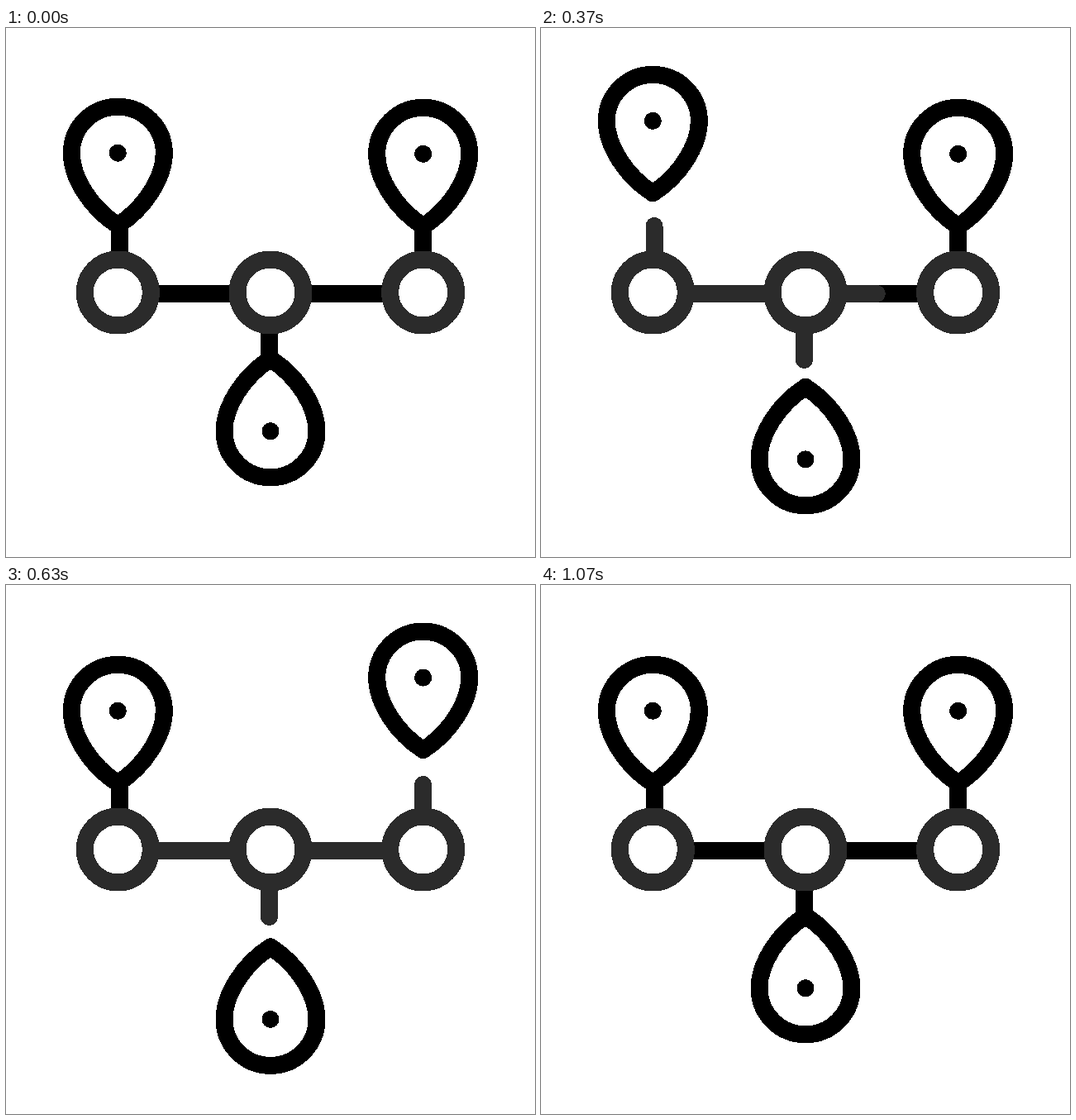
These frames come from a looping animation (640x640 px, 1.67 s). An HTML page:

```html
<!DOCTYPE html>
<html lang="en">
<head>
<meta charset="utf-8">
<title>Pins on a line</title>
<style>
  html, body { margin: 0; width: 100%; height: 100%; overflow: hidden; background: #fff; }
  svg { display: block; width: 100%; height: 100%; shape-rendering: crispEdges; }
  .line { fill: none; stroke: #000; stroke-width: 21; stroke-linecap: round; }
  .fill { stroke: #2b2b2b; }
  .ring { fill: #fff; stroke: #2b2b2b; stroke-width: 21; }
  .drop { fill: #fff; stroke: #000; stroke-width: 21; stroke-linejoin: round; }
</style>
</head>
<body>
<svg viewBox="0 0 640 640">
  <g id="lines"></g>
  <g id="rings"></g>
  <g id="pins"></g>
</svg>
<script>
const LOOP = 1670, FPS = 30, LAST = 32;
const LEFT = 135.3, MIDDLE = 320, RIGHT = 504.7;

// Times are in steps of 1/30 s: [start, duration] out, then [start, duration] back.
const pins = [
  { x: LEFT, y: 152.3, lift: -66, out: [-0.5, 6.7], back: [7.67, 7.75] },
  { x: MIDDLE, y: 487.8, lift: 63.2, flip: true, out: [6.9, 7.8], back: [15.2, 8.7] },
  { x: RIGHT, y: 152.3, lift: -66, out: [14.7, 7.5], back: [23.2, 8] }
];

const lines = [
  { from: [137, 280], to: [137, 239.5], out: [0, 3.5], back: [14, 2.8] },
  { from: [175, 321.5], to: [280, 321.5], out: [3.2, 5], back: [19, 3.7] },
  { from: [318.5, 360], to: [318.5, 401.5], out: [7, 3.5], back: [21.5, 3] },
  { from: [360, 321.5], to: [465, 321.5], out: [8.7, 5], back: [25.5, 4] },
  { from: [504.5, 280], to: [504.5, 241.5], out: [15, 3.5], back: [29, 2.8] }
];

function add(parent, tag, attrs) {
  const node = document.createElementNS("http://www.w3.org/2000/svg", tag);
  for (const name in attrs) node.setAttribute(name, attrs[name]);
  return parent.appendChild(node);
}

function ease(step, [start, duration]) {
  const u = Math.min(1, Math.max(0, (step - start) / duration));
  return u * u * (3 - 2 * u);
}

const amount = (step, part) => ease(step, part.out) - ease(step, part.back);

const byId = id => document.getElementById(id);

for (const line of lines) {
  const d = `M${line.from}L${line.to}`;
  add(byId("lines"), "path", { class: "line", d });
  line.node = add(byId("lines"), "path", { class: "line fill", d });
}

for (const cx of [LEFT, MIDDLE, RIGHT]) {
  add(byId("rings"), "circle", { class: "ring", cx, cy: 320, r: 40 });
}

for (const pin of pins) {
  pin.node = add(byId("pins"), "g", {});
  add(pin.node, "path", {
    class: "drop",
    d: "M0 87.5C-33 66.5-56 29.5-56 0A56 56 0 0 1 56 0C56 29.5 33 66.5 0 87.5Z"
  });
  add(pin.node, "circle", { r: 10.5 });
}

function draw(step) {
  for (const pin of pins) {
    const y = pin.y + pin.lift * amount(step, pin);
    pin.node.setAttribute("transform", `translate(${pin.x} ${y}) scale(1 ${pin.flip ? -1 : 1})`);
  }
  for (const { node, from, to, ...part } of lines) {
    const k = amount(step, part);
    const end = from.map((v, i) => v + (to[i] - v) * k);
    node.setAttribute("d", `M${from}L${end}`);
    node.setAttribute("visibility", k > 0 ? "visible" : "hidden");
  }
}

function tick() {
  const time = performance.now() % LOOP;
  // The small lead keeps steps on 10 ms marks.
  draw(Math.min(LAST, Math.floor((time + 3.4) * FPS / 1000)));
  requestAnimationFrame(tick);
}
tick();
</script>
</body>
</html>
```
